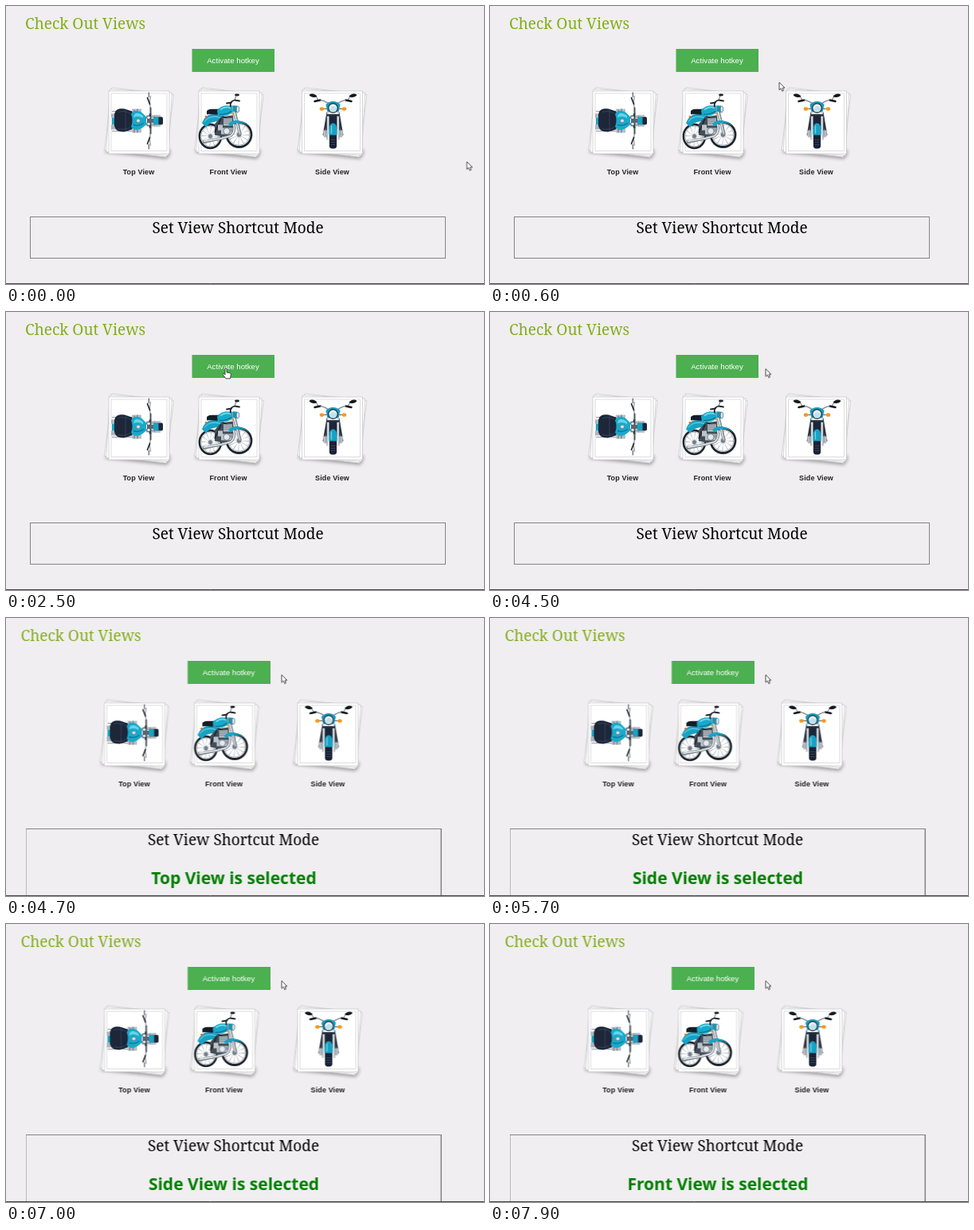
Write an HTML page that moves like this. It is 600 px wide and 350 px high and loops after 8 s.

```html
<!DOCTYPE html>
<html lang="en">
<head>
<meta charset="utf-8">
<title>Check Out Views</title>
<style>
html, body { margin: 0; width: 100%; height: 100%; overflow: hidden; background: #f0eef0; }
svg { display: block; width: 600px; height: 350px; }
.serif { font: 19px "Noto Serif", serif; }
.label { font: bold 9px "Liberation Sans", Arial, sans-serif; letter-spacing: .12px; fill: #222; text-anchor: middle; }
.button { font: 9.7px "Liberation Sans", Arial, sans-serif; fill: #fff; text-anchor: middle; }
.status { font: 900 21px "Noto Sans", sans-serif; font-stretch: extra-condensed; fill: #008000; text-anchor: middle; }
.card { fill: #fff; stroke: #c4c4c6; stroke-width: .7; }
.anim { animation: 8s step-end infinite; }
#page { animation-name: page; }
#closed { animation-name: closed; }
#open { animation-name: open; }
#top { animation-name: top; }
#side { animation-name: side; }
#front { animation-name: front; }
#arrow { animation-name: arrow; }
#hand { animation-name: hand; }
#cursor { animation: cursor 8s linear infinite; }
@keyframes page { 0% { transform: none } 57.4%, 100% { transform: translateX(-5.5px) } }
@keyframes closed { 0% { opacity: 1 } 57.4%, 100% { opacity: 0 } }
@keyframes open { 0% { opacity: 0 } 57.4%, 100% { opacity: 1 } }
@keyframes top { 0%, 66.2%, 84.9%, 100% { opacity: 0 } 57.4%, 79.9% { opacity: 1 } }
@keyframes side { 0%, 73.7%, 88.7%, 100% { opacity: 0 } 66.2%, 84.9% { opacity: 1 } }
@keyframes front { 0%, 79.9% { opacity: 0 } 73.7%, 88.7%, 100% { opacity: 1 } }
@keyframes arrow { 0%, 44.9%, 100% { opacity: 1 } 9.9% { opacity: 0 } }
@keyframes hand { 0%, 44.9%, 100% { opacity: 0 } 9.9% { opacity: 1 } }
@keyframes cursor {
  0%, 1.1% { transform: translate(578.5px, 196px) }
  1.2%, 3.7% { transform: translate(432px, 130px) }
  10% { transform: translate(318px, 74px) }
  13.7%, 31.1% { transform: translate(270px, 66px) }
  31.2%, 32.4% { transform: translate(276px, 71px) }
  32.5%, 34.9% { transform: translate(327px, 66px) }
  35%, 43.7% { transform: translate(329px, 67px) }
  47.5%, 100% { transform: translate(346px, 71.5px) }
}
</style>
</head>
<body>
<svg viewBox="0 0 600 350">
<defs>
  <filter id="blur" x="-20%" y="-200%" width="140%" height="500%"><feGaussianBlur stdDeviation="2.2"/></filter>
  <g id="stack">
    <path d="M-42 38 35 46 39 40V34H-42Z" fill="#000" opacity=".35" filter="url(#blur)"/>
    <rect class="card" x="-39" y="-39.5" width="78" height="79" transform="rotate(6.5)"/>
    <rect class="card" x="-39" y="-39.5" width="78" height="79" transform="rotate(3.3)"/>
    <rect class="card" x="-38" y="-39.5" width="76" height="79"/>
    <rect x="-35" y="-36.5" width="70" height="72.5" fill="#fff" stroke="#d4d4d6" stroke-width=".8"/>
  </g>
  <g id="grip" fill="none" stroke-linecap="round">
    <path d="M14.5-16C13-21 13-25 14.5-31" stroke="#98a0a8" stroke-width="1.3"/>
    <path d="M13.5-21 10.5-29" stroke="#25292f" stroke-width="1.7"/>
    <path d="M14.5-16V-8" stroke="#4a525b" stroke-width="2"/>
    <path d="M12.3-35.5V-30" stroke="#3c4249" stroke-width="1"/>
  </g>
  <g id="halfFront">
    <path d="M-30-34.5C-27-37-22-36-20-32.5-23-30.5-28-31.5-30-34.5Z" fill="#14171c"/>
    <path d="M-21-32 -18.5-28" stroke="#30353b" stroke-width=".8"/>
    <path d="M-23-26.5 -16-28" stroke="#15191e" stroke-width="2.4" stroke-linecap="round"/>
    <path d="M-16-28C-12-28-10-26-6-24" fill="none" stroke="#80888f" stroke-width="1.3"/>
    <path d="M-13-17H-7" stroke="#5a626a" stroke-width="1"/>
    <ellipse cx="-14" cy="-17" rx="2.8" ry="2.3" fill="#f39a22"/>
    <path d="M-8-13 -11 5 -13 16H-6V-10Z" fill="#2a3442"/>
    <path d="M-13 10H-7V19H-11.5Z" fill="#c2c7cc"/>
    <path d="M-12 12V17M-9.5 8V18" stroke="#8b939b" stroke-width=".8"/>
    <path d="M-6.2-13V22" stroke="#e3e7ea" stroke-width="2.6"/>
    <path d="M-7.6-13V22" stroke="#737d88" stroke-width=".7"/>
  </g>
  <g id="topBike">
    <path d="M-35-9H-26V-4H-35ZM-35 5H-26V11H-35Z" fill="#aeb6bd"/>
    <path d="M-34-4H-24V5H-34Z" fill="#18a4c2"/>
    <path d="M-34-12H-6M-34 13H-8" stroke="#939ca5" stroke-width="1.2"/>
    <path d="M-9-15H3V-10H-9ZM-9 10H3V15H-9Z" fill="#b7bec5"/>
    <path d="M-6-14V-10M-2-15V-10M-6 10V15M-2 10V15" stroke="#626b75"/>
    <path d="M-31-8C-30-15-24-16-18-15L-9-12C-6-7-6 7-9 11L-19 14C-27 14-30 11-31 6Z" fill="#1d2739"/>
    <path d="M-26-11C-19-13-14-11-11-9M-26 10C-19 12-14 10-11 8M-17-14V13" fill="none" stroke="#3b4861" stroke-width=".8"/>
    <path d="M-10-8C-8-14-1-14 4-10L9-5V5L4 9C-1 13-8 12-10 7-8 3-8-4-10-8Z" fill="#1aa9ca"/>
    <path d="M-6-8C-2-11 2-9 5-6V-3C1-6-3-6-7-4Z" fill="#66d4e8"/>
    <path d="M-7 5C-2 7 2 6 6 3" fill="none" stroke="#0d7798" stroke-width="1.4"/>
    <circle cx="-1" cy="0" r="2.4" fill="#d6e2e7" stroke="#517986" stroke-width=".7"/>
    <use href="#grip"/><use href="#grip" transform="scale(1 -1)"/>
    <path d="M9-7H20V-3H9ZM9 3H20V7H9Z" fill="#aab2ba"/>
    <path d="M14-9V9" stroke="#313942" stroke-width="2.6"/>
    <path d="M10-2.5H20V2.5H10Z" fill="#5b6671"/>
    <circle cx="12" cy="-4" r="2.3" fill="#dce4e8" stroke="#39434d" stroke-width=".8"/>
    <circle cx="12" cy="4" r="2.3" fill="#dce4e8" stroke="#39434d" stroke-width=".8"/>
    <rect x="18" y="-5" width="12" height="10" rx="2" fill="#1c2739"/>
    <path d="M18-4.5H24.5V4.5H18Z" fill="#17a2c2"/>
    <path d="M19-6.5H27M19 6.5H27" stroke="#838c95"/>
  </g>
  <g id="wheel" fill="none">
    <circle r="15.5" stroke="#20262e" stroke-width="2.8"/>
    <circle r="13.3" stroke="#aeb5bc" stroke-width="1"/>
    <circle r="8" stroke="#a8afb5" stroke-width="10" stroke-dasharray=".6 3.6"/>
    <circle r="3.4" fill="#747f89" stroke="#d9dfe3"/>
  </g>
  <g id="frontBike">
    <use href="#wheel" transform="translate(-23.5 17.5) scale(.88 .96)"/>
    <use href="#wheel" x="12.5" y="15.5"/>
    <path d="M-34 1C-30-10-21-13-9-9L-10-1C-18-2-24 0-29 6Z" fill="#17a2c4"/>
    <path d="M-31-1C-26-8-18-8-11-6" fill="none" stroke="#76dbea" stroke-width="1"/>
    <path d="M-18 2-10-7 5-9 7 12-3 19-18 16Z" fill="#444e59"/>
    <path d="M-18 13-10-5M-9-8 1-3 7 11" stroke="#202730" stroke-width="1.8" fill="none"/>
    <path d="M-14 3H-8V10H-14ZM-7-5H4V4H-7ZM-10 7H5V15H-10Z" fill="#bcc4ca"/>
    <path d="M-7-3H4M-7-.8H4M-7 1.4H4" stroke="#59646e" stroke-width=".7"/>
    <circle cx="-3" cy="11" r="4" fill="#e4e9ec" stroke="#77818b"/>
    <circle cx="3" cy="10" r="2.3" fill="#919aa2"/>
    <path d="M4 0C8 5 7 13 2 17L-9 20-33 25" fill="none" stroke="#7c868f" stroke-width="3.4"/>
    <path d="M4 0C8 5 7 13 2 17L-9 20-32 24" fill="none" stroke="#e6eaed" stroke-width="1.6"/>
    <path d="M-28-14C-26-18-19-16-12-17L-10-10C-17-9-22-11-28-10Z" fill="#171d27"/>
    <path d="M-15-15C-12-20-3-23 3-20L6-15C3-9-6-7-14-8Z" fill="#18a9cb"/>
    <path d="M-11-16C-7-19-2-20 2-18" fill="none" stroke="#75dceb" stroke-width="1.6"/>
    <path d="M-12-10C-6-10-1-11 3-14" fill="none" stroke="#0b6c87" stroke-width="1.1"/>
    <path d="M3-21 13 15M6-21 15 15" stroke="#88929b" stroke-width="1.8"/>
    <path d="M4-21 13.5 15" stroke="#eef1f3" stroke-width=".9"/>
    <path d="M-1 2C5-5 17-4 25 5 18 0 9-1 2 5Z" fill="#18a4c5"/>
    <path d="M2-20C1-24 3-27 7-28L13-27" fill="none" stroke="#22272e" stroke-width="1.8" stroke-linecap="round"/>
    <path d="M-3-24 3-25" stroke="#22272e" stroke-width="1.8" stroke-linecap="round"/>
    <path d="M7-28 9-34" stroke="#434951" stroke-width=".8"/>
    <ellipse cx="10" cy="-34.5" rx="3" ry="1.4" fill="#1d2229"/>
    <path d="M4-21H10C14-20 14-13 10-12L5-14Z" fill="#1695b6"/>
    <ellipse cx="11" cy="-16.5" rx="1.8" ry="4" fill="#dce8ee" stroke="#53626c" stroke-width=".6"/>
    <circle cx="4" cy="-11" r="1.3" fill="#f29a25"/>
    <circle cx="-29" cy="-7" r="1.4" fill="#df6b2b"/>
  </g>
  <g id="sideBike">
    <use href="#halfFront"/><use href="#halfFront" transform="scale(-1 1)"/>
    <path d="M-9-22C-6-28 6-28 9-22L7-13H-7Z" fill="#1a9abb"/>
    <path d="M-5-10H5V9H-5Z" fill="#1b2639"/>
    <rect x="-4.6" y="10" width="9.2" height="23" rx="3.4" fill="#182234"/>
    <path d="M-3 25H3M-3 28H3M-3 22H3" stroke="#3d4a60" stroke-width=".8"/>
    <path d="M-5 16C-6 7-4 1 0 1S6 7 5 16Z" fill="#18a1c2"/>
    <path d="M-2 4V14" stroke="#6cd5e6" stroke-width="1.3"/>
    <path d="M-8-9H8" stroke="#262e39" stroke-width="2.5"/>
    <circle cy="-18" r="6.4" fill="#29313a"/>
    <circle cy="-18" r="5.2" fill="#bfe2ee"/>
    <path d="M-3.8-18C-3-22 2-23 3.8-19" fill="none" stroke="#f4fbfd" stroke-width="1.6"/>
  </g>
</defs>

<g id="page" class="anim">
  <text class="serif" x="24" y="29" fill="#82ad1c">Check Out Views</text>
  <rect x="233.5" y="54" width="103.5" height="29" fill="#4caf50"/>
  <text class="button" x="285" y="72">Activate hotkey</text>
  <g transform="translate(167 146.5)"><use href="#stack"/><use href="#topBike" y="-2"/></g>
  <g transform="translate(280 146.5)"><use href="#stack"/><use href="#frontBike"/></g>
  <g transform="translate(409.5 146.5)"><use href="#stack"/><use href="#sideBike" x="1"/></g>
  <text class="label" x="166.5" y="212">Top View</text>
  <text class="label" x="279" y="212">Front View</text>
  <text class="label" x="409.5" y="212">Side View</text>
  <g fill="none" stroke="#858386">
    <rect id="closed" class="anim" x="30.5" y="265.5" width="521" height="52"/>
    <rect id="open" class="anim" x="30.5" y="265.5" width="521" height="100"/>
  </g>
  <text class="serif" x="291" y="286" text-anchor="middle">Set View Shortcut Mode</text>
  <g class="status">
    <text id="top" class="anim" x="291.5" y="335">Top View is selected</text>
    <text id="side" class="anim" x="291.5" y="335">Side View is selected</text>
    <text id="front" class="anim" x="291.5" y="335">Front View is selected</text>
  </g>
</g>
<path d="M0 349.5H600" stroke="#4a484a"/>

<g id="cursor">
  <path id="arrow" class="anim" d="M0 0V9.6L2.2 7.6 3.8 11.1 5.5 10.3 4 7H7Z" fill="#fff" stroke="#222" stroke-width=".8"/>
  <path id="hand" class="anim" d="M-1 .8C-1-.6 1-.6 1 .8V5L5 5.8C6 6 6.4 6.7 6.3 7.7L5.5 12.8H-.2C-1.3 10.5-3.3 9-4 7.3-3.5 6.2-2.2 6.6-1 8Z" fill="#fff" stroke="#222" stroke-width=".8"/>
</g>
</svg>
</body>
</html>
```
